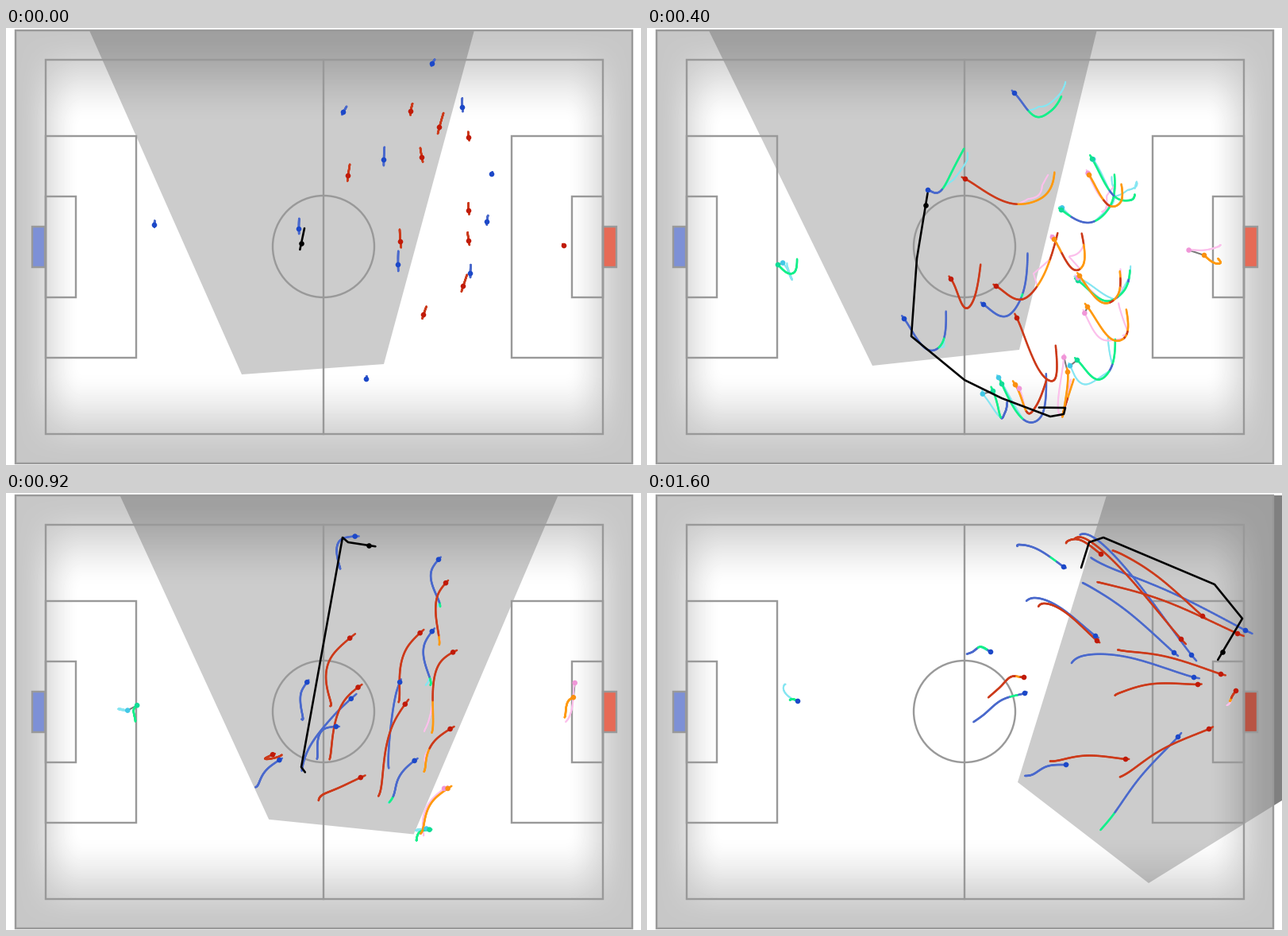
These frames come from a looping animation (800 by 550 pixels, 1.64 s). A matplotlib script:

```python
import numpy as np
import matplotlib.pyplot as plt
from matplotlib.animation import FuncAnimation
from matplotlib.collections import LineCollection
from matplotlib.patches import Circle, Polygon, Rectangle

W, H, DPI = 800, 550, 100
PX = 72 / DPI
FRAMES, INTERVAL = 41, 40
TAIL, LEAD = 6.2, 0.25          # trail length behind and ahead of a player, in frames
KNOWN = (0.5, 39.2)             # outside these times every player is known
X0, Y0, X1, Y1 = 12, 3, 789, 548
LINE = "#999999"
rng = np.random.default_rng(4)

# seen trail, seen dot, hidden trail, hidden dot, ghost trail, ghost dot
BLUE = ("#4a69cc", "#1c48c8", "#14f08a", "#10dc96", "#86e6f2", "#42c8e6")
RED = ("#cc3a1a", "#c01a08", "#ff9a10", "#fa9010", "#fcc0ec", "#f096d8")

MOMENTS = np.array([0, 6, 10, 17, 22, 28, 35, 40.])

# extra swing shared by all field players between the moments: time, dx, dy
SWING = [(0, 0, 0), (6, 0, 0), (7.8, 0, 14), (10, 0, 0), (12.3, -13, -28), (14.5, -6, -4),
         (17, 0, 0), (22, 0, 0), (25, 8, -8), (28, 0, 0), (31.5, -14, 4), (35, 0, 0),
         (37.5, 0, -6), (40, 0, 0)]

# corners of the camera view at the moments, which it pans between
FAR_LEFT = [(77, -60), (408, 317), (47, -60), (62, -60), (78, -60), (297, -60), (342, -60), (673, -300)]
FAR_RIGHT = [(607, -60), (621, 410), (582, -60), (583, -60), (695, -60), (860, -60), (927, -60), (1000, 263)]
NEAR_RIGHT = [(476, 423), (494, 567), (469, 405), (462, 457), (505, 434), (557, 407), (571, 417), (632, 491)]
NEAR_LEFT = [(297, 436), (284 + 98, 512), (284, 425), (306, 472), (327, 421), (352, 360), (369, 358), (467, 364)]

# time, x, y at every touch of the ball; it runs straight between them
BALL = [(-.6, 376, 252), (.6, 368, 290), (1.5, 390, 375), (2.9, 434, 477), (4.3, 527, 478),
        (4.7, 525, 486), (5.1, 508, 489), (6.25, 447, 466), (7, 400, 443), (8, 333, 388),
        (8.9, 340, 290), (10.3, 354, 205), (12, 379, 257), (14.6, 414, 436), (15.3, 413, 400),
        (17, 372, 345), (21.8, 424, 56), (22.2, 431, 62), (24, 490, 71), (26.2, 573, 53),
        (26.7, 585, 63), (28, 522, 83), (30, 528, 130), (31.2, 502, 87), (33, 567, 66),
        (33.8, 547, 94), (34.3, 557, 62), (35, 575, 56), (37.6, 715, 115), (39, 750, 158),
        (40.3, 718, 212)]


def curve(k, xy, t):
    """Cubic Hermite curve that passes the points xy at the times k."""
    xy = np.array(xy, float)
    m = np.gradient(xy, k, axis=0)
    i = np.clip(np.searchsorted(k, t, side="right") - 1, 0, len(k) - 2)
    h = (k[i + 1] - k[i])[:, None]
    s = (t - k[i])[:, None] / h
    return ((1 + 2 * s) * (1 - s) ** 2 * xy[i] + s * (1 - s) ** 2 * h * m[i]
            + s ** 2 * (3 - 2 * s) * xy[i + 1] + s ** 2 * (s - 1) * h * m[i + 1])


def linear(k, xy, t):
    return np.column_stack([np.interp(t, k, c) for c in np.transpose(xy)])


def split(timed):
    p = np.array(timed, float)
    return p[:, 0], p[:, 1:]


def view_at(t):
    """View corners, clockwise, as an array of shape (times, 4, 2)."""
    sides = (FAR_LEFT, FAR_RIGHT, NEAR_RIGHT, NEAR_LEFT)
    return np.stack([linear(MOMENTS, s, t) for s in sides], axis=1)


def outside_by(p, view):
    """How far each point lies outside the view; negative inside."""
    edge = np.roll(view, -1, axis=1) - view
    rel = p[:, None] - view
    cross = edge[..., 0] * rel[..., 1] - edge[..., 1] * rel[..., 0]
    return (-cross / np.hypot(edge[..., 0], edge[..., 1])).max(axis=1)


class Player:
    def __init__(self, team, *stops, swing=1):
        self.team, self.stops, self.swing = team, stops, swing
        self.phase = rng.uniform(0, 2 * np.pi, 2)

    def at(self, t, view):
        """True place, guessed place and whether the camera misses the player."""
        k, sway = split(SWING)
        pos = curve(MOMENTS, self.stops, t) + self.swing * curve(k, sway, np.clip(t, 0, 40))
        out = outside_by(pos, view)
        hidden = (out > 0) & (t > KNOWN[0]) & (t < KNOWN[1])
        # the guess drifts further off the further away the player is
        error = 14 * np.clip(out / 70, 0, 1) * np.clip(t / 4, 0, 1) * np.clip((40 - t) / 6, 0, 1)
        wander = np.sin(t[:, None] / 3 + self.phase) - .4
        return pos, pos + error[:, None] * wander, hidden


# each player's place at the moments
players = [
    Player(BLUE, (537, 45), (508, 105), (463, 82), (421, 95), (425, 57), (522, 84), (469, 65), (525, 93)),
    Player(BLUE, (425, 106), (384, 181), (354, 204), (373, 285), (373, 248), (404, 210), (410, 200), (433, 200)),
    Player(BLUE, (476, 166), (472, 338), (424, 348), (392, 334), (403, 296), (483, 330), (484, 355), (528, 342)),
    Player(BLUE, (575, 100), (583, 225), (522, 229), (535, 241), (528, 188), (583, 126), (560, 119), (664, 201)),
    Player(BLUE, (612, 184), (607, 217), (561, 165), (547, 142), (537, 95), (588, 55), (579, 92), (754, 173)),
    Player(BLUE, (606, 244), (599, 333), (543, 318), (482, 345), (491, 254), (504, 195), (488, 132), (565, 180)),
    Player(BLUE, (585, 309), (584, 429), (542, 418), (517, 437), (525, 425), (571, 443), (585, 408), (669, 307)),
    Player(BLUE, (494, 298), (497, 488), (447, 448), (484, 388), (502, 348), (574, 295), (549, 205), (689, 232)),
    Player(BLUE, (369, 253), (371, 398), (324, 366), (315, 370), (333, 344), (398, 314), (423, 280), (476, 252)),
    Player(BLUE, (454, 442), (451, 484), (436, 457), (373, 347), (413, 280), (553, 156), (561, 55), (686, 204)),
    Player(BLUE, (187, 248), (186, 307), (165, 298), (163, 287), (162, 270), (185, 262), (181, 260), (190, 262),
           swing=.2),
    Player(RED, (510, 105), (497, 214), (401, 190), (409, 268), (413, 202), (560, 98), (531, 60), (572, 77)),
    Player(RED, (546, 125), (496, 318), (440, 325), (408, 334), (428, 259), (524, 202), (500, 139), (567, 186)),
    Player(RED, (583, 138), (596, 220), (557, 185), (546, 190), (545, 126), (600, 81), (600, 78), (700, 155)),
    Player(RED, (524, 163), (550, 297), (513, 266), (495, 262), (507, 192), (601, 124), (584, 116), (744, 177)),
    Player(RED, (431, 186), (411, 343), (383, 316), (347, 330), (328, 333), (390, 317), (443, 246), (475, 232)),
    Player(RED, (583, 230), (592, 338), (545, 312), (537, 300), (548, 212), (645, 194), (603, 199), (723, 228)),
    Player(RED, (497, 269), (513, 443), (466, 365), (470, 380), (489, 288), (571, 170), (551, 57), (673, 184)),
    Player(RED, (583, 268), (603, 388), (555, 351), (527, 350), (544, 308), (641, 263), (597, 251), (694, 241)),
    Player(RED, (576, 325), (524, 485), (530, 433), (523, 428), (542, 383), (631, 341), (606, 352), (708, 297)),
    Player(RED, (526, 361), (490, 476), (464, 449), (394, 386), (428, 367), (543, 327), (516, 337), (603, 335)),
    Player(RED, (703, 274), (722, 296), (702, 286), (704, 282), (710, 260), (743, 256), (735, 261), (742, 249),
           swing=.2),
]

fig = plt.figure(figsize=(W / DPI, H / DPI), dpi=DPI, facecolor="white")
ax = fig.add_axes([0, 0, 1, 1])
ax.axis("off")


def draw_pitch():
    def fade(lo, hi, reach):
        v = np.arange(lo, hi) + .5
        u = np.clip(np.minimum(v - lo, hi - v) / reach, 0, 1)
        return u * u * (3 - 2 * u)

    light = np.outer(fade(Y0, Y1, 120), fade(X0, X1, 85))
    ax.imshow(.78 + .22 * light, cmap="gray", vmin=0, vmax=1, zorder=1, aspect="auto",
              extent=(X0, X1, Y1, Y0))

    def box(left, top, right, bottom, fill=None):
        size = (left, top), right - left, bottom - top
        if fill:
            ax.add_patch(Rectangle(*size, fc=fill, lw=0, zorder=1.5))
        ax.add_patch(Rectangle(*size, fill=False, ec=LINE, lw=2.4 * PX, zorder=3))

    box(X0, Y0, X1, Y1)
    box(50, 40, 752, 511)
    box(50, 136, 164, 415)
    box(637, 136, 752, 415)
    box(50, 212, 88, 339)
    box(713, 212, 752, 339)
    box(33, 250, 49, 301, "#7d90d6")
    box(752, 250, 769, 301, "#e66a56")
    ax.plot([400, 400], [40, 511], color=LINE, lw=2.4 * PX, zorder=3)
    ax.add_patch(Circle((400, 275), 64, fill=False, ec=LINE, lw=2.4 * PX, zorder=3))


draw_pitch()
ax.set_xlim(0, W)
ax.set_ylim(H, 0)


def view_patch(clip, **style):
    patch = ax.add_patch(Polygon(np.zeros((4, 2)), lw=0, **style))
    patch.set_clip_path(Rectangle(*clip, transform=ax.transData))
    return patch


beyond = view_patch(((0, Y0), W, H - Y0), fc="#808080", zorder=.5)
shade = view_patch(((X0, Y0), X1 - X0, Y1 - Y0), fc="black", alpha=.2, zorder=2)


def strokes(width, z):
    lines = LineCollection([], linewidths=width * PX, capstyle="round", zorder=z)
    return ax.add_collection(lines, autolim=False)


links, ghosts, trails = strokes(2, 4), strokes(2, 5), strokes(2.5, 6)
links.set_color("#777777")
dots = ax.scatter([], [], s=(6.6 * PX) ** 2, lw=0, zorder=7)
ball_trail, = ax.plot([], [], color="black", lw=2.6 * PX, zorder=8,
                      solid_capstyle="round", solid_joinstyle="round")
ball_dot, = ax.plot([], [], "o", color="black", ms=6.6 * PX, mew=0, zorder=9)


def pieces(points):
    return np.stack([points[:-1], points[1:]], axis=1)


def update(n):
    now = np.array([float(n)])
    t = np.linspace(max(n - TAIL, -.6), n + LEAD, 80)
    view, view_now = view_at(t), view_at(now)
    beyond.set_xy(view_now[0])
    shade.set_xy(view_now[0])

    link, faint, faint_col, solid, solid_col, spots, spot_col = ([] for _ in range(7))
    for p in players:
        pos, ghost, hidden = p.at(t, view)
        missed = hidden[:-1]
        solid.extend(pieces(pos))
        solid_col.extend(p.team[2 if h else 0] for h in missed)
        faint.extend(pieces(ghost)[missed])
        faint_col.extend([p.team[4]] * missed.sum())

        pos, ghost, hidden = p.at(now, view_now)
        if hidden[0]:
            link.append([pos[0], ghost[0]])
            spots.append(ghost[0])
            spot_col.append(p.team[5])
        spots.append(pos[0])
        spot_col.append(p.team[3 if hidden[0] else 1])

    links.set_segments(link)
    ghosts.set_segments(faint)
    ghosts.set_color(faint_col)
    trails.set_segments(solid)
    trails.set_color(solid_col)
    dots.set_offsets(spots)
    dots.set_facecolor(spot_col)

    # include the touches so that the ball's corners stay sharp
    k, xy = split(BALL)
    stops = np.concatenate([t[:1], k[(k > t[0]) & (k < t[-1])], t[-1:]])
    ball_trail.set_data(*linear(k, xy, stops).T)
    ball_dot.set_data(*linear(k, xy, now).T)
    return beyond, shade, links, ghosts, trails, dots, ball_trail, ball_dot


anim = FuncAnimation(fig, update, frames=FRAMES, interval=INTERVAL, repeat=True,
                     repeat_delay=0, blit=False)
plt.show()
```
